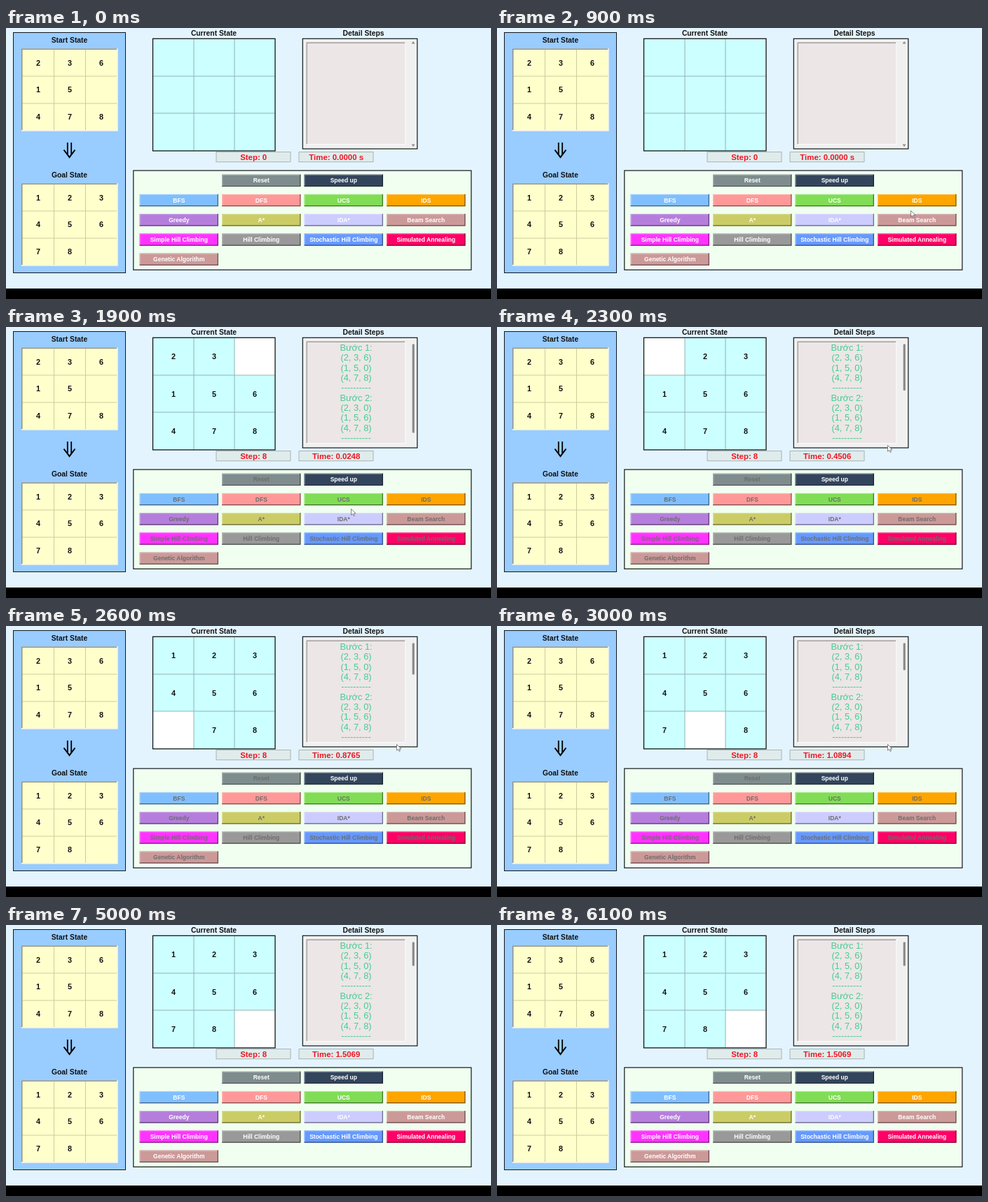
These frames come from a looping animation (692x388 px, 6300 ms). An HTML page:

```html
<!DOCTYPE html>
<html lang="en">
<head>
<meta charset="utf-8">
<title>8-puzzle solver</title>
<style>
  html, body { margin: 0; width: 100%; height: 100%; overflow: hidden; background: #e4f4fe; }
  svg { display: block; width: 692px; height: 388px; }
  text { font-family: "Liberation Sans", Arial, sans-serif; font-weight: bold; text-anchor: middle; }
</style>
</head>
<body>
<svg id="stage" viewBox="0 0 692 388"></svg>
<script>
const LOOP = 6300, TICK = 100;
const stage = document.getElementById('stage');

function add(tag, attrs, parent = stage) {
  const node = document.createElementNS('http://www.w3.org/2000/svg', tag);
  for (const key in attrs) node.setAttribute(key, attrs[key]);
  return parent.appendChild(node);
}
const box = (x, y, width, height, fill, more) => add('rect', { x, y, width, height, fill, ...more });
const line = (d, stroke, width = 1) =>
  add('path', { d, stroke, fill: 'none', 'stroke-width': width });
const show = (node, on) => node.style.display = on ? '' : 'none';
function label(str, x, y, size, fill = '#111', parent = stage) {
  const node = add('text', { x, y, 'font-size': size, fill }, parent);
  node.textContent = str;
  return node;
}
function bevel(x, y, w, h, light, dark, width = 1) {
  const k = width / 2, r = x + w - k, b = y + h - k;
  return [
    line(`M${x + k} ${b}V${y + k}H${r}`, light, width),
    line(`M${x} ${b}H${r}V${y}`, dark, width)
  ];
}
// Blends a hex colour towards a grey level (255 white, 0 black).
function blend(hex, level, k) {
  const mix = [1, 3, 5].map(i =>
    Math.round(parseInt(hex.slice(i, i + 2), 16) * (1 - k) + level * k));
  return `rgb(${mix})`;
}

// Page
box(0, 0, 692, 388, '#e4f4fe');
box(0, 373, 692, 15, '#000');

// Left panel
box(10.5, 6.5, 160, 344, '#99ccff', { stroke: '#101820' });
function smallGrid(title, titleY, top, values) {
  label(title, 90.5, titleY, 10.3);
  box(22, top, 137.5, 118, '#ffffcc');
  for (const x of [68.5, 113.5]) line(`M${x} ${top + 1}v116`, '#cfcb9c');
  for (const y of [39.5, 78.5]) line(`M23 ${top + y}h136`, '#cfcb9c');
  bevel(22, top, 137.5, 118, '#8f9088', '#f4f4ea', 1.5);
  [...values].forEach((v, i) =>
    label(v, 46 + 45 * (i % 3), top + 24.2 + 38.5 * Math.floor(i / 3), 10.8));
}
smallGrid('Start State', 20.5, 29.5, '23615 478');
smallGrid('Goal State', 213.5, 222.5, '12345678 ');
line('M87.8 164V181.5M93.2 164V181.5', '#000', 1.8);
line('M82.5 174.5L90.5 185L98.5 174.5', '#000', 2);

// Board
label('Current State', 296.5, 11.3, 10.3);
box(209.5, 15.3, 174.5, 160.6, '#ccffff');
const hole = box(0, 0, 58, 53.5, '#fff');
for (const x of [268, 326]) line(`M${x} 16V176`, '#8fb3b5');
for (const y of [69, 122]) line(`M210 ${y}H384`, '#8fb3b5');
box(209.5, 15.3, 174.5, 160.6, 'none', { stroke: '#101818', 'stroke-width': 1.3 });
const tiles = Array.from({ length: 9 }, (_, i) =>
  label('', 239 + 58 * (i % 3), 46.3 + 53.3 * Math.floor(i / 3), 10.8));

// Detail list
label('Detail Steps', 510, 11.3, 10.3);
box(423.3, 15.3, 163.5, 157.7, '#f0f0f0', { stroke: '#101818', 'stroke-width': 1.2 });
box(428.5, 20.5, 142, 147, '#ece6e6');
bevel(428.5, 20.5, 142, 147, '#a5a0a0', '#fafafa', 1.4);
const arrows = add('path', {
  d: 'M578.5 22.5l2.5 -3.5l2.5 3.5zM578.5 166.5l2.5 3.5l2.5 -3.5z', fill: '#8b8b8b'
});
const thumb = box(579.7, 24.5, 3, 0, '#868686', { rx: 1 });
const details = ['Bước 1:', '(2, 3, 6)', '(1, 5, 0)', '(4, 7, 8)', '----------',
  'Bước 2:', '(2, 3, 0)', '(1, 5, 6)', '(4, 7, 8)', '----------'].map((str, i) => {
  const row = label(str, 499.5, 33.8 + 14.36 * i, 12.8, '#45cc94');
  row.style.fontWeight = 'normal';
  return row;
});
const STEP_ROWS = 5, VIEW_ROWS = 10.2, TROUGH = 137;

// Counters
function counter(x) {
  box(x, 177, 107, 15.2, '#e0ecec');
  bevel(x, 177, 107, 15.2, '#a9b5b5', '#a9b5b5');
  return label('', x + 53.7, 188.6, 11.4, '#ee1522');
}
const stepText = counter(299.5), timeText = counter(417.5);

// Buttons
box(181.8, 204.1, 482, 142.2, '#f0fff0', { stroke: '#101818', 'stroke-width': 1.2 });
const buttons = [
  ['Reset', 1, 0, '#7f8c8d'], ['Speed up', 2, 0, '#33455c'],
  ['BFS', 0, 1, '#80bfff'], ['DFS', 1, 1, '#ff9999'],
  ['UCS', 2, 1, '#80dd55'], ['IDS', 3, 1, '#ffa500'],
  ['Greedy', 0, 2, '#b57edc'], ['A*', 1, 2, '#cccc66'],
  ['IDA*', 2, 2, '#ccccff'], ['Beam Search', 3, 2, '#cc9999'],
  ['Simple Hill Climbing', 0, 3, '#ff33ff'], ['Hill Climbing', 1, 3, '#999999'],
  ['Stochastic Hill Climbing', 2, 3, '#6699ff'], ['Simulated Annealing', 3, 3, '#ff0066'],
  ['Genetic Algorithm', 0, 4, '#cc9999']
].map(([name, col, row, fill]) => {
  const x = 190.6 + 117.5 * col, y = 209.7 + 28.2 * row;
  const light = blend(fill, 255, 0.3), dark = blend(fill, 0, 0.5);
  const face = box(x, y, 112.3, 17.4, fill);
  const edges = bevel(x, y, 112.3, 17.4, light, dark, 1.2);
  const text = label(name, x + 56.2, y + 11.7, 8.5, '#fff');
  return { name, fill, light, dark, face, edges, text };
});

const cursor = add('path', {
  d: 'M.5 .5V9.2L2.6 7.4L4 10.5L5.4 9.9L4.1 6.9H7z',
  fill: '#fff', stroke: '#555', 'stroke-width': 0.7
});

// [time, board, seconds]; 0 marks the empty cell
const moves = [
  [1700, '236150478', 0], [1800, '230156478', 0.0248], [2000, '203156478', 0.2377],
  [2200, '023156478', 0.4506], [2400, '123056478', 0.6635], [2600, '123456078', 0.8765],
  [2800, '123456708', 1.0894], [3100, '123456780', 1.3023], [3300, '123456780', 1.5069]
];
const STEPS = 8;
// [time, x, y]
const track = [
  [600, 622, 252], [700, 622, 252], [900, 590, 261], [1100, 500, 291],
  [1300, 455, 306], [1500, 461, 303], [1700, 461, 303], [1900, 492, 260], [2200, 557, 169]
];
const PRESS = 1500, START = 1700, DONE = 3300, CURSOR_OUT = 5000;

function cursorAt(t) {
  const i = track.findIndex(p => p[0] > t);
  if (i < 0) return track[track.length - 1].slice(1);
  const [t0, x0, y0] = track[i - 1], [t1, x1, y1] = track[i];
  const k = (t - t0) / (t1 - t0);
  return [x0 + (x1 - x0) * k, y0 + (y1 - y0) * k];
}

function draw(t) {
  const past = moves.filter(m => m[0] <= t);
  const [, cells, seconds] = past[past.length - 1] || [0, '', 0];
  const running = past.length > 0;
  tiles.forEach((tile, i) => tile.textContent = (cells[i] || '').replace('0', ''));
  const gap = cells.indexOf('0');
  show(hole, running);
  hole.setAttribute('x', 210 + 58 * (gap % 3));
  hole.setAttribute('y', 16 + 53 * Math.floor(gap / 3));
  stepText.textContent = 'Step: ' + (running ? STEPS : 0);
  timeText.textContent = 'Time: ' + (running ? seconds.toFixed(4) : '0.0000 s');

  // The list grows with each step and its scroll thumb shrinks.
  const rows = STEP_ROWS * Math.min(past.length, STEPS);
  const part = VIEW_ROWS / (rows + 1);
  details.forEach((row, i) => show(row, i < rows));
  show(thumb, part < 1);
  show(arrows, part >= 1);
  thumb.setAttribute('height', TROUGH * Math.min(part, 1));

  const busy = t >= START && t < DONE;
  for (const b of buttons) {
    const down = b.name.startsWith('Stoch') && t >= PRESS && t < START;
    const off = busy && b.name !== 'Speed up';
    b.face.setAttribute('fill', down ? '#f0f0f0' : b.fill);
    b.text.setAttribute('fill', down ? '#111' : off ? '#6d6d6d' : '#fff');
    b.edges[0].setAttribute('stroke', down ? '#8c8c8c' : b.light);
    b.edges[1].setAttribute('stroke', down ? '#fff' : b.dark);
  }

  const shown = t >= track[0][0] && t < CURSOR_OUT;
  show(cursor, shown);
  if (shown) cursor.setAttribute('transform', `translate(${cursorAt(t)})`);
}

const begin = performance.now();
function frame() {
  const t = (performance.now() - begin) % LOOP;
  draw(Math.floor(t / TICK) * TICK);
  requestAnimationFrame(frame);
}
frame();
</script>
</body>
</html>
```
